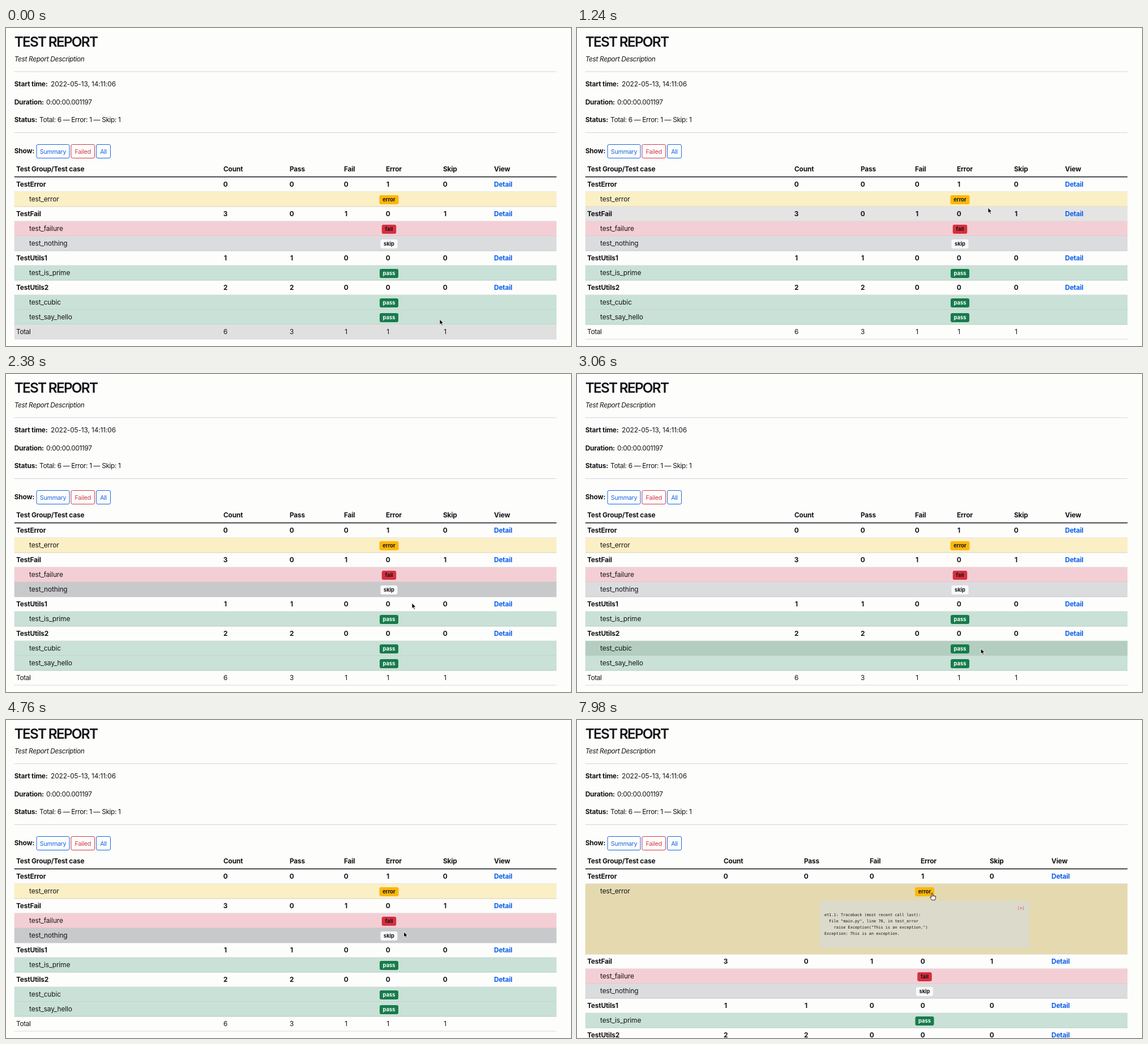
Recreate the animation shown at these times as an HTML page. Size 998 by 561 pixels, loop 8000 ms.

```html
<!DOCTYPE html>
<html lang="en">
<head>
<meta charset="utf-8">
<title>Test report</title>
<style>
  html, body { margin: 0; width: 100%; height: 100%; overflow: hidden; background: #fdfdfc; }
  svg { display: block; width: 998px; height: 561px; }
  text { font: 11.9px Inter, sans-serif; letter-spacing: -.03em; fill: #141417; white-space: pre; }
  .title { font-size: 24.3px; font-weight: 600; letter-spacing: -.07em; }
  .italic { font-style: italic; }
  .bold { font-weight: 700; letter-spacing: -.015em; }
  .loose { letter-spacing: -.01em; }
  .cell { text-anchor: middle; }
  .link { font-weight: 700; letter-spacing: -.015em; fill: #0b60ea; }
  .button { font-size: 10.8px; text-anchor: middle; }
  .badge { font-size: 9.3px; font-weight: 700; text-anchor: middle; letter-spacing: 0; }
  .mono { font: 6.9px "DejaVu Sans Mono", monospace; letter-spacing: 0; }
</style>
</head>
<body>
<svg viewBox="0 0 998 561">
  <g id="page"></g>
  <g id="arrow" stroke="#fff" stroke-width=".9" stroke-linejoin="round">
    <path fill="#000" d="M0 0V9.6L2.2 7.6 3.9 11.4 5.5 10.7 3.9 7.1 6.9 6.9Z"/>
  </g>
  <g id="hand" stroke="#111" stroke-width=".9" stroke-linejoin="round">
    <path fill="#fff" d="M-1 1Q0-.6 1 1V4.7Q2.2 3.7 3 5Q4.3 4.2 4.9 5.6Q6.4 5 6.6 6.8V9.3L5.4 12.6H-.2L-3.2 8.4Q-3.6 6.8-2 7.2L-1 8.2Z"/>
    <path fill="none" d="M1 4.7V7M3 5V7M4.9 5.6V7.3" stroke-width=".6"/>
  </g>
</svg>
<script>
const LOOP = 8000, EXPAND_AT = 6900, HOVER_LAG = 100;
const LEFT = 14.7, RIGHT = 972.4, TABLE_TOP = 263, ROW = 26, DETAIL_HEIGHT = 98;
const HALF_DIGIT = 3.6;

const closedLayout = { columns: [384, 501, 597, 671, 772, 862], badge: 676.5, extra: 0 };
const openLayout = { columns: [259, 401, 517, 607, 729, 838], badge: 614, extra: DETAIL_HEIGHT };

// Row looks: background, hovered background, bottom border.
const looks = {
  group: ["none", "#e4e4e5", "#d3d5d8"],
  total: ["none", "#e0e0e0", "#d9dbd8"],
  error: ["#fbefc5", "#e5d9b0", "#d9d2b6"],
  fail: ["#f3cfd5", "#dfbcc2", "#dcbbc3"],
  skip: ["#dbdcde", "#c8c9cb", "#c5c7ca"],
  pass: ["#c9e1d7", "#b3cec1", "#b7cdc3"]
};
// Badge looks: background, text colour, width.
const badges = {
  error: ["#fdb70c", "#141417", 34],
  fail: ["#d7303f", "#141417", 25.5],
  skip: ["#f8f9fa", "#141417", 30],
  pass: ["#177b4c", "#fff", 33]
};
const rows = [
  ["group", "TestError", "00010"],
  ["error", "test_error"],
  ["group", "TestFail", "30101"],
  ["fail", "test_failure"],
  ["skip", "test_nothing"],
  ["group", "TestUtils1", "11000"],
  ["pass", "test_is_prime"],
  ["group", "TestUtils2", "22000"],
  ["pass", "test_cubic"],
  ["pass", "test_say_hello"],
  ["total", "Total", "63111"]
];
// Pointer path: time, x, y.
const path = [
  [-100, 769, 535], [0, 766, 514], [580, 749, 392], [1240, 726, 317],
  [1700, 720, 299], [2380, 717, 404], [3100, 713, 489], [3850, 710, 500],
  [4040, 708, 445], [5000, 701, 350], [5800, 690, 309], [6180, 687, 307],
  [7250, 687, 307], [7850, 627, 305], [LOOP, 627, 305]
];

const text = (x, y, content, cls = "", attrs = "") =>
  `<text x="${x}" y="${y}" class="${cls}" ${attrs}>${content}</text>`;
const rect = (x, y, w, h, fill, attrs = "") =>
  `<rect x="${x}" y="${y}" width="${w}" height="${h}" fill="${fill}" ${attrs}/>`;
const rule = (y, color, h = 1) => rect(LEFT, y, RIGHT - LEFT, h, color);
const button = (x, w, label, color) =>
  rect(x, 205.5, w, 24, "none", `rx="2.5" stroke="${color}"`) +
  text(x + w / 2, 221.8, label, "button", `style="fill:${color}"`);

const rowTop = (i, layout) => TABLE_TOP + i * ROW + (i > 1 ? layout.extra : 0);

function header() {
  const fact = (y, label, x, value, cls) => text(LEFT, y, label, "bold") + text(x, y, value, cls);
  return text(LEFT, 33, "TEST REPORT", "title") +
    text(LEFT, 59, "Test Report Description", "italic") +
    rule(76.5, "#d2d2df") +
    fact(103.3, "Start time:", 79, "2022-05-13, 14:11:06", "loose") +
    fact(134.8, "Duration:", 71, "0:00:00.001197") +
    fact(166.3, "Status:", 59, "Total: 6 — Error: 1 — Skip: 1") +
    rule(184, "#d2d2df") +
    text(LEFT, 220.8, "Show:", "bold") +
    button(54, 58, "Summary", "#1767e6") +
    button(115, 41.5, "Failed", "#d33a4a") +
    button(159.5, 25, "All", "#1767e6");
}

function traceback() {
  const lines = [
    "et1.1: Traceback (most recent call last):",
    "  File \"main.py\", line 70, in test_error",
    "    raise Exception(\"This is an exception.\")",
    "Exception: This is an exception."
  ];
  return rect(429, 319, 370, 83, "#dcdacb") +
    text(778, 333.8, "[x]", "mono", 'style="fill:#e0434f"') +
    lines.map((line, i) => text(437, 345.8 + i * 11.1, line, "mono")).join("");
}

function tableRow([kind, name, counts], i, layout, hovered) {
  const top = rowTop(i, layout), height = rowTop(i + 1, layout) - top, base = top + 16.8;
  const [fill, hoverFill, border] = looks[kind];
  let out = rect(LEFT, top, RIGHT - LEFT, height, hovered ? hoverFill : fill) +
    rule(top + height - .5, border);
  if (counts) {
    const weight = kind === "group" ? "bold" : "";
    out += text(18, base, name, weight) +
      [...counts].map((n, c) => text(layout.columns[c] + HALF_DIGIT, base, n, "cell " + weight)).join("");
    if (kind === "group") out += text(layout.columns[5], base, "Detail", "link");
  } else {
    const [color, ink, width] = badges[kind];
    out += text(41, base, name, "loose") +
      rect(layout.badge - width / 2, top + 6, width, 16, color, 'rx="3"') +
      text(layout.badge, top + 17, kind, "badge", `style="fill:${ink}"`);
  }
  return out;
}

function drawPage(layout, hoveredRow) {
  const titles = ["Count", "Pass", "Fail", "Error", "Skip", "View"];
  return header() +
    text(18, 253.2, "Test Group/Test case", "bold") +
    titles.map((title, c) => text(layout.columns[c], 253.2, title, "bold")).join("") +
    rows.map((row, i) => tableRow(row, i, layout, i === hoveredRow)).join("") +
    rule(261.8, "#1d1f25", 1.6) +
    (layout.extra ? traceback() : "");
}

function pointerAt(t) {
  const next = Math.max(1, path.findIndex(p => p[0] >= t));
  const [t0, x0, y0] = path[next - 1], [t1, x1, y1] = path[next];
  const k = (t - t0) / (t1 - t0);
  return [x0 + (x1 - x0) * k, y0 + (y1 - y0) * k];
}

const page = document.getElementById("page");
const arrow = document.getElementById("arrow");
const hand = document.getElementById("hand");
const start = performance.now();
let shown = "";

function frame() {
  const t = (performance.now() - start) % LOOP;
  const layout = t < EXPAND_AT ? closedLayout : openLayout;
  const [x, y] = pointerAt(t);
  const hoverY = pointerAt(t - HOVER_LAG)[1];
  const hovered = rows.findIndex((_, i) => hoverY >= rowTop(i, layout) && hoverY < rowTop(i + 1, layout));

  const state = `${layout.extra}/${hovered}`;
  if (state !== shown) page.innerHTML = drawPage(layout, hovered);
  shown = state;

  const onBadge = Math.abs(x - layout.badge) < 17 && y > 294 && y < 311;
  for (const [shape, visible] of [[hand, onBadge], [arrow, !onBadge]]) {
    shape.setAttribute("transform", `translate(${x} ${y})`);
    shape.setAttribute("visibility", visible ? "visible" : "hidden");
  }
  requestAnimationFrame(frame);
}
frame();
</script>
</body>
</html>
```
